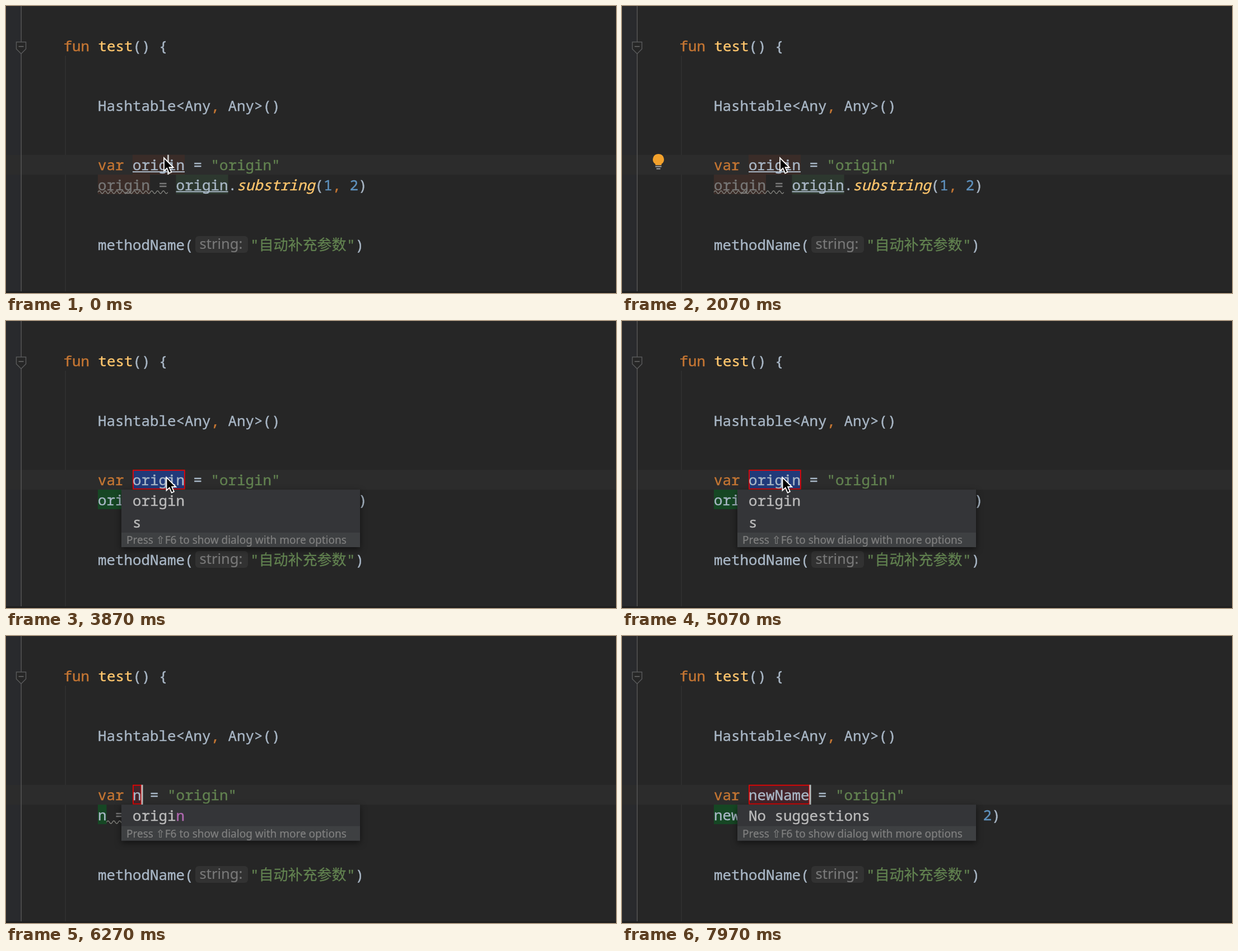
These frames come from a looping animation (1089 by 514 pixels, 8000 ms). An HTML page:

```html
<!DOCTYPE html>
<html lang="en">
<meta charset="utf-8">
<title>Inline rename</title>
<style>
html, body { margin: 0; width: 100%; height: 100%; overflow: hidden; background: #262626; }
svg { display: block; width: 1089px; height: 514px; }
text { white-space: pre; }
.code { font-family: "Noto Sans Mono", monospace; font-size: 25.83px; stroke-width: .4px; }
.ui { font-family: "Noto Sans", sans-serif; stroke-width: .2px; }
.cjk { font-family: "Noto Sans CJK SC", "Noto Sans CJK", sans-serif; font-size: 26px; stroke-width: .3px; }
</style>
<svg id="stage" viewBox="0 0 1089 514"></svg>
<script>
const LOOP = 8000, CHAR = 15.5, LEFT = 164;
const BULB_ON = 600, POPUP = 2600;
const KEYS = [6200, 6420, 6600, 6900, 7100, 7280, 7480];
const PLAIN = '#a9b7c6', KEYWORD = '#c57633', FUNC = '#ffc66d', STRING = '#628250',
      NUMBER = '#5f92bf', GREY = '#777', LIST = '#bbb';
const stage = document.getElementById('stage');

const escapeText = s => s.replace(/&/g, '&amp;').replace(/</g, '&lt;').replace(/>/g, '&gt;');
const rect = (x, y, w, h, fill, extra = '') =>
  `<rect x="${x}" y="${y}" width="${w}" height="${h}" fill="${fill}" ${extra}/>`;
const path = (d, stroke, width = 1.5, fill = 'none') =>
  `<path d="${d}" stroke="${stroke}" stroke-width="${width}" fill="${fill}"/>`;
const text = (x, y, s, fill, cls = 'code', extra = '') =>
  `<text x="${x}" y="${y}" fill="${fill}" stroke="${fill}" class="${cls}" ${extra}>${escapeText(s)}</text>`;

// Lays out [string, colour, attributes] parts on the monospace grid
function code(x, y, ...parts) {
  let out = '';
  for (const [s, fill, extra] of parts) {
    out += text(x, y, s, fill, 'code', extra);
    x += s.length * CHAR;
  }
  return out;
}

function wave(x1, x2, y) {
  let d = `M${x1} ${y}`;
  for (let x = x1, up = true; x < x2; x += 5.2, up = !up) d += `q2.6 ${up ? -5 : 5} 5.2 0`;
  return path(d, '#84847f', 1.4);
}

const underline = (x, y) => rect(x, y, 6 * CHAR, 2, PLAIN);

const backdrop =
  rect(0, 0, 1089, 514, '#262626') +
  rect(0, 0, 27, 514, '#292a2d') +
  rect(105.5, 89, 1.2, 425, '#353535') +
  rect(0, 266.5, 1089, 35.5, '#2c2c2c') +
  rect(26.4, 0, 1.5, 514, '#555') +
  path('M18.5 64.5H35.5V77L27 85.5L18.5 77Z', '#58595a', 1.5, '#262626') +
  path('M22.5 72.5H31.5', '#6b6b6b') +
  rect(0, 511, 1089, 3, '#1f1f1f') +
  code(102.5, 80.5, ['fun ', KEYWORD], ['test', FUNC], ['() {', PLAIN]) +
  code(LEFT, 187.5, ['Hashtable<Any', PLAIN], [', ', KEYWORD], ['Any>()', PLAIN]) +
  code(LEFT, 437, ['methodName(', PLAIN]) +
  rect(338, 412, 94, 30, '#323232', 'rx="6"') +
  text(345.5, 435, 'string:', '#787878', 'ui', 'font-size="25.5"') +
  code(436, 437, ['"', STRING]) + text(451.5, 437, '自动补充参数', STRING, 'cjk') +
  code(608, 437, ['"', STRING], [')', PLAIN]);

function assignment(name, renaming) {
  const w = name.length * CHAR, second = LEFT + w + 3 * CHAR;
  return rect(LEFT, 302, w, 35, renaming ? '#164724' : '#3a2c28') +
    rect(second, 302, w, 35, renaming ? '#164724' : '#2d382f') +
    code(LEFT, 330, [name, renaming ? PLAIN : GREY], [' = ', GREY], [name, PLAIN], ['.', PLAIN],
      ['substring', FUNC, 'font-style="italic"'], ['(', PLAIN], ['1', NUMBER], [', ', KEYWORD],
      ['2', NUMBER], [')', PLAIN]) +
    wave(renaming ? LEFT + w : LEFT, second - CHAR, 333.5) +
    (renaming ? '' : underline(second, 331.5));
}

function declaration(name, renaming, typed) {
  const w = name.length * CHAR, x = LEFT + 4 * CHAR;
  const box = renaming
    ? rect(x + 1, 267.3, w - 1.2, 33.4, typed ? '#44242a' : '#213a7a', 'stroke="#f00000" stroke-width="1.7"')
    : rect(x, 266.5, w, 35.5, '#3a2c28') + underline(x, 296);
  return box + code(LEFT, 294, ['var ', KEYWORD], [name, PLAIN], [' = ', PLAIN], ['"origin"', STRING]);
}

function popup(typed) {
  const rows = typed ? 1 : 2, foot = 302 + rows * 38.5;
  let list;
  if (typed > 1) list = code(226, 331, ['No suggestions', LIST]);
  else if (typed) list = code(226, 331, ['origi', LIST], ['n', '#b068b0']);
  else list = code(226, 331, ['origin', LIST]) + code(226, 370, ['s', LIST]);
  return rect(206, 302, 426, foot - 276, '#343538', 'style="filter:drop-shadow(0 4px 6px #0008)"') +
    rect(206, foot, 426, 26, '#3e4042') + list +
    text(215, foot + 20, 'Press ⇧F6 to show dialog with more options', '#808080', 'ui', 'font-size="19"');
}

const bulb =
  path('M65 265A9.8 9.8 0 0 1 70.5 283V285H59.5V283A9.8 9.8 0 0 1 65 265Z', 'none', 0, '#f2a12c') +
  path('M59.5 287.5H70.5M61.5 291.5H68.5', '#a4a6a8', 2);

const pointer = (x, y) => `<g transform="translate(${x} ${y})">` +
  path('M1 1V24.5L6.3 19.6L10.2 28.5L14.4 26.6L10.6 18H17.8Z', '#fff', 1.8, '#000') + '</g>';

function caretVisible(t, typed) {
  if (typed) return (t - KEYS[typed - 1]) % 1000 < 500;
  if (t < POPUP) return (t + 460) % 1000 < 500;
  return (t + 700) % 1000 < 500;
}

let shown = '';
function draw(t) {
  const typed = KEYS.filter(k => t >= k).length;
  const renaming = t >= POPUP;
  const name = typed ? 'newName'.slice(0, typed) : 'origin';
  const caretX = LEFT + (4 + (typed || 4)) * CHAR;
  const p = Math.min(1, Math.max(0, (t - 3200) / 150));
  const glide = p * p * (3 - 2 * p);

  const scene = backdrop + declaration(name, renaming, typed) + assignment(name, renaming) +
    (t >= BULB_ON && !renaming ? bulb : '') +
    (caretVisible(t, typed) ? rect(caretX, 266.5, 3, 35.5, '#bbb') : '') +
    (renaming ? popup(typed) : '') +
    (typed ? '' : pointer(281 + 4.5 * glide, 271 + 8 * glide));
  if (scene !== shown) stage.innerHTML = shown = scene;
}

function tick() {
  draw(performance.now() % LOOP);
  requestAnimationFrame(tick);
}
tick();
</script>
</html>
```
